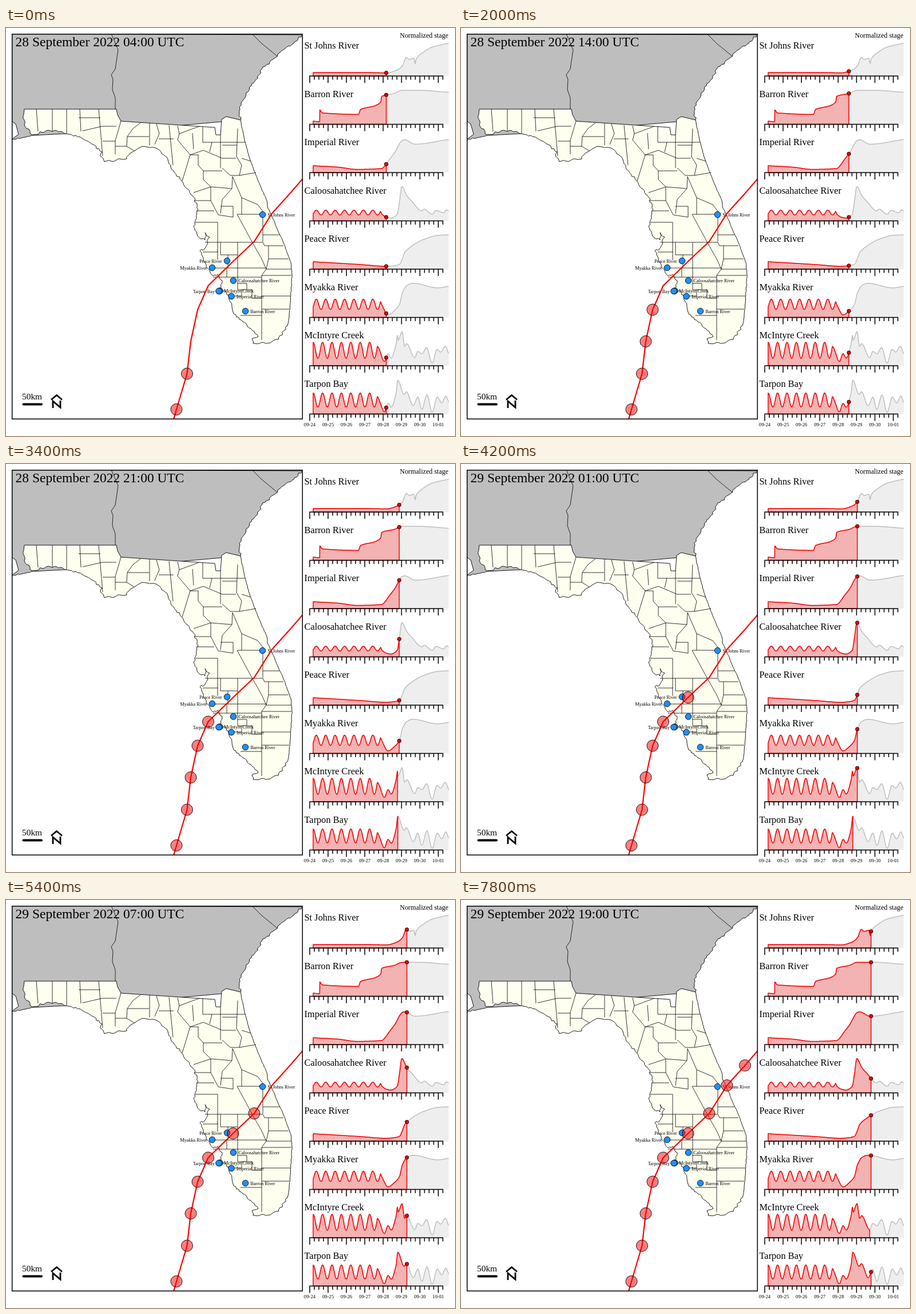
An HTML page for the animation above (8 s loop, 785 by 714 pixels).

```html
<!DOCTYPE html>
<html lang="en">
<head>
<meta charset="utf-8">
<title>River stage during a hurricane</title>
<style>
html, body { margin: 0; width: 100%; height: 100%; overflow: hidden; background: #fff; }
svg { display: block; font-family: "Liberation Serif", "Times New Roman", serif; }
path { fill: none; stroke: #000; }
.land { stroke-width: .9; stroke-linejoin: round; }
.line { stroke-width: .8; }
.gauge { fill: #1e90ff; stroke: #000; stroke-width: .9; }
.storm { fill: #f00; fill-opacity: .5; stroke: #000; stroke-width: .9; }
.all { fill: #eee; stroke: none; }
.allLine { stroke: #bebebe; stroke-width: 1.5; }
.past { fill: #f00; fill-opacity: .25; stroke: #f00; stroke-width: 1.5; stroke-linejoin: round; }
.now { fill: #e00000; stroke: #000; stroke-width: .8; }
.axis { stroke-width: 1.5; }
</style>
</head>
<body>
<svg width="785" height="714" viewBox="0 0 785 714">
  <clipPath id="frame"><path d="M11 11H518V684H11Z"/></clipPath>
  <g clip-path="url(#frame)">
    <g id="land"></g>
    <g id="gauges"></g>
    <g id="storms"></g>
  </g>
  <path class="axis" d="M10.7 10.7H518.3V684.3H10.7Z"/>
  <text id="clock" x="16.5" y="32" font-size="23.5"></text>
  <text x="28" y="650" font-size="15.4">50km</text>
  <path d="M30.5 658.5H62" stroke-width="4" stroke-linecap="round"/>
  <path d="M79 650.5L88.5 642.5 98 650.5M82 665V653L95 664V652" stroke-width="2.8"/>
  <text x="773.5" y="17" font-size="12.1" text-anchor="end">Normalized stage</text>
  <g id="charts"></g>
</svg>
<script>
const HOUR_MS = 200, HOURS = 40, START_HOUR = 4;
const AXIS_X = 531, DAY_W = 32.1, ROW_H = 84.5, TIDE_W = 16.45;
const byId = id => document.getElementById(id);

function add(parent, tag, attrs, text) {
  const el = document.createElementNS("http://www.w3.org/2000/svg", tag);
  for (const key in attrs) el.setAttribute(key, attrs[key]);
  if (text) el.textContent = text;
  return parent.appendChild(el);
}

const parse = str => str.split(",").map(pair => pair.trim().split(" ").map(Number));
const polyline = points => "M" + points.map(([x, y]) => x.toFixed(2) + " " + y.toFixed(2)).join("L");
const area = (points, base) => `${polyline(points)}V${base}H${points[0][0]}Z`;

let seed = 7;
const random = () => (seed = seed * 16807 % 2147483647) / 2147483647;

// Turns a coarse coast into a ragged one by nudging points sideways.
function ragged(points, rough) {
  const out = [];
  points.slice(1).forEach(([x1, y1], i) => {
    const [x0, y0] = points[i], length = Math.hypot(x1 - x0, y1 - y0);
    const steps = Math.ceil(length / 4);
    for (let k = 0; k < steps; k++) {
      const u = k / steps, push = k ? (random() * 2 - 1) * rough : 0;
      out.push([x0 + (x1 - x0) * u - (y1 - y0) / length * push,
        y0 + (y1 - y0) * u + (x1 - x0) / length * push]);
    }
  });
  return [...out, points[points.length - 1]];
}

const land = byId("land");
const georgiaCoast = parse("517 12,503 27,485 38,468 54,447 72,440 88,429 101,411 131,408 150,410 161");
const alabamaCoast = parse("45 188,34 191,10 195");
const stateLine = parse("32 142,193 142,195 152,201 163,365 174,367 187,375 187,377 160,385 155,410 161");
const eastCoast = parse("410 161,417 196,426 228,441 268,456 302,457 312,470 341,485 376,498 410,500 432,499 452,495 506,492 521");
const gulfCoast = parse("492 521,476 545,462 551,432 552,430 544,441 540,428 526,408 510,397 497,389 468,382 460,373 461,378 442,370 431,362 434,345 408,339 390,347 387,356 366,348 358,348 371,338 367,328 347,336 318,328 296,318 282,293 250,283 230,262 210,238 207,215 222,211 229,172 234,165 224,168 217,150 203,133 193,95 181,70 180,46 187,32 169,31 151");

add(land, "path", { class: "land", fill: "#bebebe", style: "fill:#bebebe", d: polyline([
  [10, 10], ...ragged(georgiaCoast, 2), [200, 180], ...ragged(alabamaCoast, 1),
  [22, 186], [17, 168], [10, 163]]) + "Z" });
add(land, "path", { class: "line", d: "M184 10L196 38 191 72 184 82 187 90 186 108 191 122V142M430 10L447 27 475 50" });
add(land, "path", { class: "land", style: "fill:#fffff0", d: polyline([
  ...stateLine, ...ragged(eastCoast, .5), ...ragged(gulfCoast, 1.8)]) + "Z" });

const counties = {
  panhandle: "M53 142L56 181M81 142V181M106 142V184M129 142L131 181M127 157H165M162 142L169 224M134 180L168 172H193M169 198H191M201 163L191 197V221M191 207H211L224 215M235 166L222 176 212 190 211 207M212 190H250M251 167V205M263 168L268 185 260 204M267 194H293M285 170L292 240",
  north: "M300 171L303 185 300 196 322 222M303 185L338 172M326 184L328 212M322 222L345 214 378 228M344 173V200H418M356 217L360 200M375 186V245M405 176L403 225 412 240M378 205H404M378 228H402M408 258L437 253M412 228L428 233M378 245L392 258H408L412 240M322 222H336V240L345 250H378M322 222L308 268M345 250V265L358 278 328 288M358 278L395 281 396 260",
  central: "M396 260L412 297 440 309 453 326M395 281L378 300 375 325M358 278V302L371 327M329 302H358M333 320H364M331 340H370V406M371 327L397 331V312H375M404 326H453M412 297V326M404 326L430 374M449 326V374M449 362H478M344 392H371M348 375H449L452 381H485",
  south: "M459 381V404H494M459 404L455 422H499M430 374L447 404 455 422 447 433M375 375V397H405M405 375V458M388 397V420M355 420H455M362 436H447M386 420V436M412 458V469H389M405 447H421V458M405 458H430V473H447M447 546V433H499M447 469H497M447 492H495M410 503H447"
};
for (const region in counties) add(land, "path", { class: "line", d: counties[region] });

// Stage curves as x y knots; gaps are spans without readings.
const inland = [
  { row: 0, name: "St Johns River", knots: "537 78,627 78,665 78.5,684 73.5,693 66,700 51.5,705 55,713 53,715.5 62,717 54.5,730 42,745 33.5,774 26.5" },
  { row: 1, name: "Barron River", knots: "537 163,548.4 164,548.6 143.5,553 148.5,600 151,616 151.3,620 142.5,645 136,655 129.5,657 119.5,679 114.3,693 109,720 109,774 112.5" },
  { row: 2, name: "Imperial River", knots: "537 241,580 243.5,614 247.5,656 246,672 228,679 219,693 196.7,697 195.7,715 203.3,774 195" },
  { row: 4, name: "Peace River", knots: "537 409,620 414,665 417,679 415.8,688 413.4,693 403.5,697 393,709 382,730 370,757 362.7,774 362" }
];
// Before the storm these follow a tide around mid.
const tidal = [
  { row: 3, name: "Caloosahatchee River", mid: 323, swing: 4.2, peak: 559, knots: "657 325.5,665 331,673 332.5,684 326,688 303,692 277.5,701 293.5,709 302.7,727 320,731 317,745 326,752 319.3,765 323.5,770 318.3,774 320" },
  { row: 5, name: "Myakka River", mid: 483.5, swing: 9, peak: 559, knots: "657 484,668 502,679 494.5,688 483.5,693 463.5,701 450.5,711 446.7,755 454.7,774 452" },
  { row: 6, name: "McIntyre Creek", mid: 564, swing: 14, peak: 553.5, gaps: [[684.6, 691], [714.7, 719]], knots: "652 561,661.5 583.5,668 570,673.5 577.5,682 553,684.5 537.5,685.5 546,692.5 531.5,697 557,700.5 552.5,714.5 577,720 566,727 570,735.5 559.5,745 586.5,753.5 562.5,760 567,768 557,774 570" }
];
const bay = { row: 7, name: "Tarpon Bay", mid: 651, swing: 12.3, peak: 553.5, gaps: [[685.1, 697]], knots: "652 650,661.5 671.5,668 657,673.5 663.5,682 639,685 616.5,696 641,700 636.5,712 661,720 646,727 667.5,736 642,745 672.5,754 646,762 656,769 644,774 655" };
const rivers = [...inland, ...tidal, bay];

function tideKnots({ mid, swing, peak }, until) {
  const knots = [];
  for (let x = 537; x < until; x += TIDE_W / 12)
    knots.push([x, mid - swing * Math.cos(2 * Math.PI * (x - peak) / TIDE_W)]);
  return knots;
}

// Monotone cubic interpolation, sampled finely in x.
function sampleCurve(knots) {
  const slope = i => (knots[i + 1][1] - knots[i][1]) / (knots[i + 1][0] - knots[i][0]);
  const tangent = i => {
    if (i === 0) return slope(0);
    if (i === knots.length - 1) return slope(i - 1);
    const a = slope(i - 1), b = slope(i);
    return a * b > 0 ? 2 * a * b / (a + b) : 0;
  };
  const points = [];
  for (let i = 0; i < knots.length - 1; i++) {
    const [x0, y0] = knots[i], [x1, y1] = knots[i + 1], w = x1 - x0;
    const steps = Math.ceil(w * 2);
    for (let k = 0; k < steps; k++) {
      const u = k / steps, v = 1 - u;
      points.push([x0 + u * w, v * v * (1 + 2 * u) * y0 + u * u * (3 - 2 * u) * y1
        + u * v * w * (v * tangent(i) - u * tangent(i + 1))]);
    }
  }
  return [...points, knots[knots.length - 1]];
}

const charts = byId("charts");
for (const river of rivers) {
  const base = river.base = 84 + ROW_H * river.row;
  let knots = parse(river.knots);
  if (river.swing) knots = [...tideKnots(river, knots[0][0] - 2), ...knots];
  river.points = sampleCurve(knots);
  add(charts, "path", { class: "all", d: area(river.points, base) });
  add(charts, "path", { class: "allLine", d: polyline(river.points) });
  river.past = add(charts, "path", { class: "past" });
  let axis = `M530.3 ${base}H764.5`;
  for (let i = 0; i < 30; i++) axis += `M${AXIS_X + i * DAY_W / 4} ${base}v${i % 4 ? 6.5 : 12}`;
  add(charts, "path", { class: "axis", d: axis });
  river.dot = add(charts, "circle", { class: "now", r: 3.2 });
  add(charts, "text", { x: 521.5, y: base - 48, "font-size": 16.4 }, river.name);
}
["09-24", "09-25", "09-26", "09-27", "09-28", "09-29", "09-30", "10-01"].forEach((day, i) =>
  add(charts, "text", { x: AXIS_X + i * DAY_W, y: 697, "font-size": 8.7, "text-anchor": "middle" }, day));

const gauges = [
  ["St Johns River", 448.5, 326.5, 1], ["Peace River", 386.5, 407.5, -1],
  ["Myakka River", 360.5, 419.5, -1], ["Caloosahatchee River", 397.5, 442, 1],
  ["McIntyre Creek", 374, 460, 1, 7], ["Tarpon Bay", 372, 460.5, -1, 7],
  ["Imperial River", 394, 469.5, 1], ["Barron River", 418.5, 495.5, 1]
];
for (const [, cx, cy] of gauges) add(byId("gauges"), "circle", { class: "gauge", cx, cy, r: 5.3 });
for (const [name, x, y, side, gap = 9] of gauges)
  add(byId("gauges"), "text", { x: x + side * gap, y: y + 3, "font-size": 8.2, "text-anchor": side > 0 ? "start" : "end" }, name);

// Storm centre every six hours, the first at 18:00 on 27 September.
const fixes = parse("298 667.5,316.5 605,323 548.5,335 493,353.5 451,397 408.5,434 373.5,465 324.5,496.5 289.5");
add(byId("storms"), "path", { style: "stroke:#f00;stroke-width:2.2", d: polyline([[293, 685], ...fixes, [519, 263.5]]) });
const storms = fixes.map(([cx, cy]) => add(byId("storms"), "circle", { class: "storm", cx, cy, r: 10 }));

function show(hour) {
  const clock = START_HOUR + hour;
  const x = AXIS_X + DAY_W * (4 + clock / 24);
  byId("clock").textContent =
    `${28 + Math.floor(clock / 24)} September 2022 ${String(clock % 24).padStart(2, "0")}:00 UTC`;
  storms.forEach((circle, i) => circle.setAttribute("visibility", clock >= 6 * (i - 1) ? "visible" : "hidden"));
  for (const { points, base, past, dot, gaps = [] } of rivers) {
    const gap = gaps.find(([from, to]) => x > from && x < to);
    const end = gap ? gap[0] : x;
    const seen = points.filter(point => point[0] <= end);
    const [x0, y0] = seen[seen.length - 1], [x1, y1] = points[seen.length];
    const y = y0 + (y1 - y0) * (end - x0) / (x1 - x0);
    if (!gap) seen.push([end, y]);
    past.setAttribute("d", area(seen, base));
    dot.setAttribute("cx", end);
    dot.setAttribute("cy", y);
    dot.setAttribute("visibility", gap ? "hidden" : "visible");
  }
}

let shown = -1;
const started = performance.now();
function tick() {
  const hour = Math.floor((performance.now() - started) / HOUR_MS) % HOURS;
  if (hour !== shown) show(shown = hour);
  requestAnimationFrame(tick);
}
tick();
</script>
</body>
</html>
```
